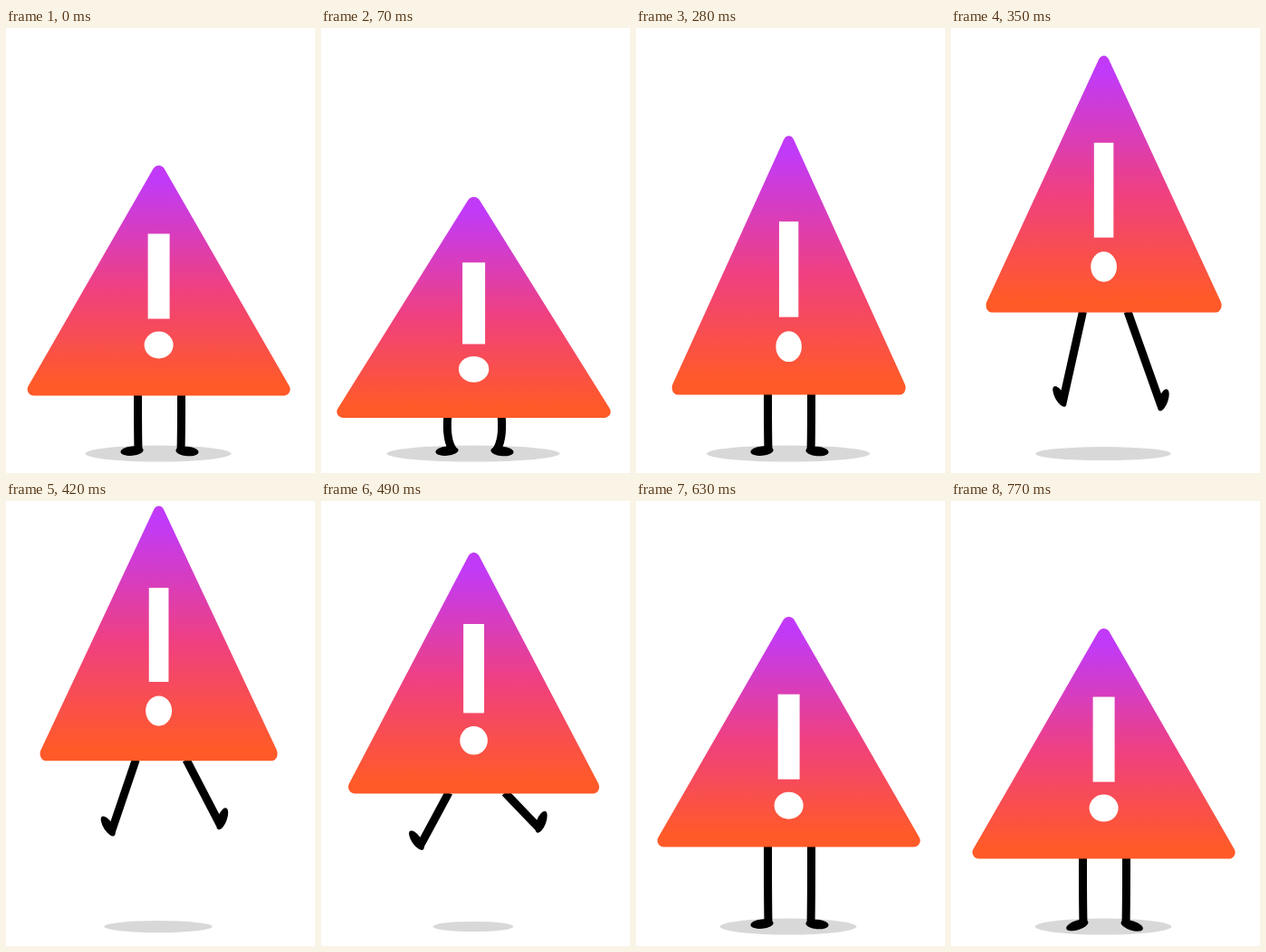
Write an HTML page with a canvas that moves like this. It is 341x492 px and loops after 0.84 s.

```html
<!DOCTYPE html>
<html lang="en">
<head>
<meta charset="utf-8">
<style>
  html, body { margin: 0; overflow: hidden; background: #fff; }
  canvas { display: block; }
</style>
</head>
<body>
<canvas id="stage" width="341" height="492"></canvas>
<script>
const ctx = document.getElementById('stage').getContext('2d');
const STEP = 70, STEPS = 12, TAU = Math.PI * 2;
const CX = 168.6, MIRROR = 339, REST = 406.5, HALF = 145, HEIGHT = 254.5;
const lerp = (a, b, p) => a + (b - a) * p;

// Crouch, jump, then recoil: base line, half width and shadow radius at step t
function pose(t) {
  if (t < 4) {
    const p = t / 3, ease = 1 - (1 - p) ** 2.55;
    return { base: REST + 38 * ease, half: HALF + 18.5 * p, shadow: 80.5 + 23 * ease };
  }
  if (t < 9) return {
    base: 287 + 31.8 * (t - 5.93) ** 2,
    half: 130 + 1.06 * (t - 5) ** 3,
    shadow: 44.5 + 15.2 * Math.abs(t - 7)
  };
  return { base: REST - 24 * (1 - ((t - 9) / 3) ** 1.5), half: HALF, shadow: 75.3 };
}

function ellipse(x, y, rx, ry, color, angle = 0) {
  ctx.fillStyle = color;
  ctx.beginPath();
  ctx.ellipse(x, y, rx, ry, angle, 0, TAU);
  ctx.fill();
}

function leg(hipX, hipY, kneeX, ankleX, ankleY, toeDegrees) {
  const toe = toeDegrees * Math.PI / 180;
  ctx.strokeStyle = '#000';
  ctx.lineWidth = 9;
  ctx.beginPath();
  ctx.moveTo(hipX, hipY - 1);
  ctx.quadraticCurveTo(kneeX, lerp(hipY, ankleY, 0.7), ankleX, ankleY);
  ctx.stroke();
  ellipse(ankleX + 7 * Math.cos(toe), ankleY + 7 * Math.sin(toe), 12.6, 5.2, '#000', toe);
}

function swingingLeg(base, hip, ankle, drop, toe) {
  leg(hip, base, lerp(hip, ankle, 0.7), ankle, base + drop, toe);
}

function standingLegs(base, toe) {
  const crouch = Math.max(0, base - REST);
  const hip = 145.5 - 0.0096 * crouch ** 2;
  const knee = hip - 0.08 * crouch;
  leg(hip, base, knee, 146, 467, toe);
  leg(MIRROR - hip, base, MIRROR - knee, MIRROR - 146, 467.4, 180 - toe);
}

function drawLegs(t, base) {
  if (t < 5 || t > 7) {
    standingLegs(base, 175 - 6 * Math.max(0, t - 9));
    return;
  }
  const p = (t - 5) / 2;
  swingingLeg(base, lerp(145.5, 141, p), lerp(123.3, 109.5, p), lerp(99, 57.5, p), lerp(241, 235, p));
  swingingLeg(base, lerp(195, 203, p), lerp(232, 240.5, p), lerp(103.5, 38, p), lerp(-71, -69, p));
}

// Drawn at rest size on the base line; squash keeps the area constant
function drawSign(base, half, lag) {
  const squash = half / HALF, r = 7;
  ctx.save();
  ctx.translate(CX, base);
  ctx.scale(squash, 1 / squash);
  const fill = ctx.createLinearGradient(0, -HEIGHT, 0, 0);
  fill.addColorStop(0.07, '#c13af7');
  fill.addColorStop(0.54, '#f0407f');
  fill.addColorStop(0.95, '#ff5a28');
  ctx.fillStyle = ctx.strokeStyle = fill;
  ctx.lineWidth = 2 * r;
  ctx.lineJoin = 'round';
  ctx.beginPath();
  ctx.moveTo(0, r - HEIGHT);
  ctx.lineTo(HALF - r, -r);
  ctx.lineTo(r - HALF, -r);
  ctx.closePath();
  ctx.fill();
  ctx.stroke();

  ctx.translate(0, lag * squash);
  ctx.fillStyle = '#fff';
  ctx.fillRect(-12, -179, 24, 94);
  ellipse(0, -56, 16, 15, '#fff');
  ctx.restore();
}

function draw(now) {
  const t = Math.floor(now / STEP) % STEPS;
  const { base, half, shadow } = pose(t);
  const rise = pose((t + STEPS - 1) % STEPS).base - base;
  const inAir = t > 4 && t < 8;
  ctx.clearRect(0, 0, 341, 492);
  ellipse(168, 470.6, shadow, inAir ? 3 + shadow * 0.06 : 9, '#d8d8d8');
  drawLegs(t, base);
  drawSign(base, half, Math.min(12, Math.max(0, rise * 0.25)));
}

const start = performance.now();
function tick() {
  draw(performance.now() - start);
  requestAnimationFrame(tick);
}
tick();
</script>
</body>
</html>
```
